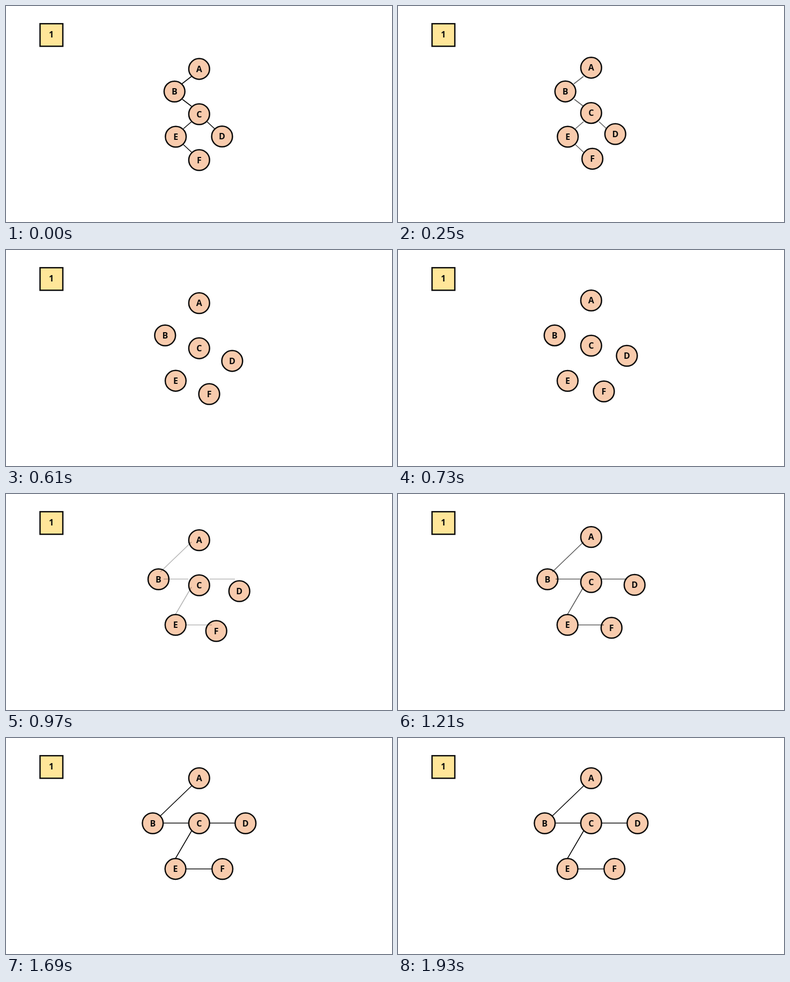
An HTML page that plays this animation: 720 by 405 pixels, repeating every 2.13 s.

```html
<!DOCTYPE html>
<html lang="en">
<head>
<meta charset="utf-8">
<title>Tree to graph</title>
<style>
  html, body { margin: 0; width: 100%; height: 100%; overflow: hidden; background: #fff; }
  svg { display: block; width: 720px; height: 405px; }
  text { font: 700 16px "Open Sans", "Noto Sans", sans-serif; text-anchor: middle; fill: #0a0a0a; }
  circle, rect { stroke: #0a0a0a; stroke-width: 2.5; }
  circle { fill: #f8cbad; }
  rect { fill: #ffe699; }
  path { fill: none; stroke: #0a0a0a; stroke-width: 1.6; }
</style>
</head>
<body>
<svg viewBox="0 0 720 405">
  <rect x="63.5" y="33.2" width="42.5" height="42.3"/>
  <text x="84.5" y="59.4">1</text>
  <path id="tree" d="M346 132L328 146M329 175L346 188M346 217L331 230M375 217L389 230M331 260L346 274"/>
  <g id="nodes"></g>
  <path id="graph" d="M346 90L288 146M294 159.5H340M380 159.5H427M346 174.5L316 226M336 245.5H384"/>
</svg>
<script>
  const LOOP = 2130, HOLD = 70, STEP = 60, LAST = 31;
  const MOVE_START = 0.4, MOVE_END = 27.85, ACCEL = 0.17;

  // label, start x, y, end x, y
  const nodes = [
    ["A", 360.3, 118, 360.3, 75.3],
    ["B", 314.3, 160.3, 273.7, 159.8],
    ["C", 360.3, 202.8, 360.3, 159.8],
    ["D", 403, 244.6, 446.8, 159.8],
    ["E", 316.7, 245.1, 316.1, 245.5],
    ["F", 360.3, 288.8, 403.7, 245.5]
  ];

  const byId = id => document.getElementById(id);
  const ramp = (v, from, to) => Math.min(1, Math.max(0, (v - from) / (to - from)));

  // short acceleration, then a long deceleration
  const ease = u => u < ACCEL ? u * u / ACCEL : 1 - (1 - u) ** 2 / (1 - ACCEL);

  byId("nodes").innerHTML = nodes.map(([label]) =>
    `<g><circle r="19.4"/><text y="5.7">${label}</text></g>`).join("");
  const groups = [...byId("nodes").children];

  function draw(ms) {
    const step = Math.min(LAST, Math.max(0, Math.floor((ms - HOLD) / STEP)));
    const k = ease(ramp(step, MOVE_START, MOVE_END));
    nodes.forEach(([, x0, y0, x1, y1], i) => {
      const x = x0 + (x1 - x0) * k, y = y0 + (y1 - y0) * k;
      groups[i].setAttribute("transform", `translate(${x.toFixed(2)} ${y.toFixed(2)})`);
    });
    byId("tree").style.opacity = 1 - ramp(step, 0.4, 7.8);
    byId("graph").style.opacity = ramp(step, 11.8, 22.8);
  }

  const start = performance.now();
  function tick() {
    draw((performance.now() - start) % LOOP);
    requestAnimationFrame(tick);
  }
  tick();
</script>
</body>
</html>
```
